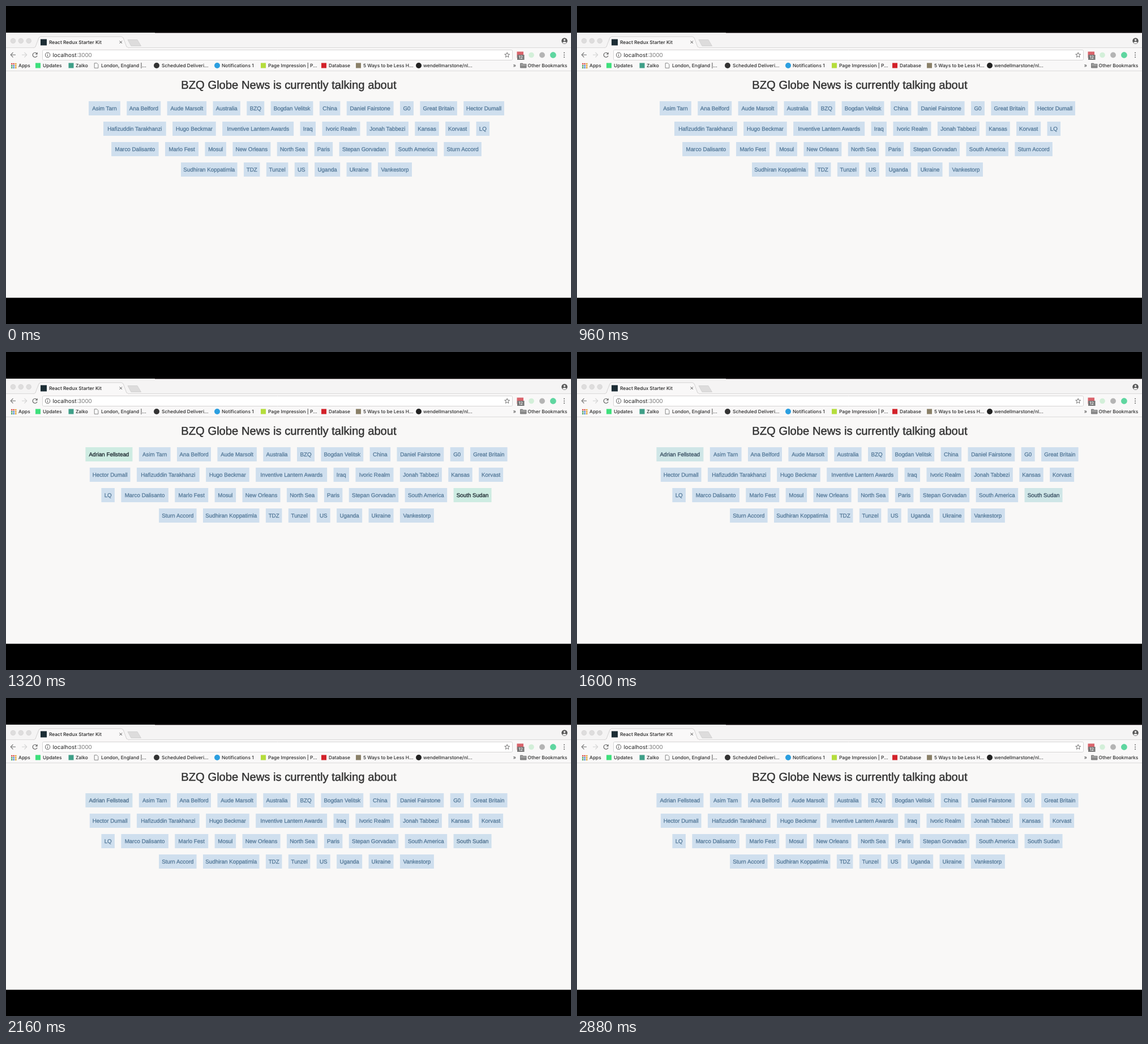
Recreate the animation shown at these times as an HTML page with a canvas. Size 998 by 561 pixels, loop 3 s.

```html
<!DOCTYPE html>
<html lang="en">
<head>
<meta charset="utf-8">
<title>Talking about</title>
<style>
  html, body { margin: 0; width: 100%; height: 100%; overflow: hidden; background: #000; }
  canvas { display: block; }
</style>
</head>
<body>
<canvas id="stage" width="998" height="561"></canvas>
<script>
const ctx = document.getElementById('stage').getContext('2d');
const LOOP = 3000, ARRIVE = 1000, FADE = 1700, STEP = 40;
const UI = 'Inter, Roboto, sans-serif';
const PAGE = '"Liberation Sans", Arial, sans-serif';
ctx.textRendering = 'geometricPrecision';

// label, box width; a leading + marks tags that arrive later
const tags = [
  ['+Adrian Fellstead', 83], ['Asim Tarn', 55.8], ['Ana Belford', 60], ['Aude Marsolt', 69.5],
  ['Australia', 48.3], ['BZQ', 31], ['Bogdan Velitsk', 74.8], ['China', 36.5],
  ['Daniel Fairstone', 82.8], ['G0', 24], ['Great Britain', 65.5], ['Hector Dumall', 71.7],
  ['Hafizuddin Tarakhanzi', 110.8], ['Hugo Beckmar', 76.6], ['Inventive Lantern Awards', 126],
  ['Iraq', 27.5], ['Ivoric Realm', 67], ['Jonah Tabbezi', 74], ['Kansas', 42.5],
  ['Korvast', 43], ['LQ', 23.5], ['Marco Dalisanto', 83.5], ['Marlo Fest', 59],
  ['Mosul', 37.5], ['New Orleans', 67], ['North Sea', 54.5], ['Paris', 32.5],
  ['Stepan Gorvadan', 87.5], ['South America', 74.5], ['+South Sudan', 67],
  ['Sturn Accord', 66.5], ['Sudhiran Koppatimla', 99.5], ['TDZ', 28.5], ['Tunzel', 38.5],
  ['US', 24], ['Uganda', 45], ['Ukraine', 44], ['Vankestorp', 60]
].map(([s, w]) => ({ label: s.replace('+', ''), w, fresh: s[0] === '+' }));

// label, text x, icon kind, icon colour, icon centre x
const bookmarks = [
  ['Apps', 22, 'grid', '', 13.5],
  ['Updates', 65, 'square', '#3fe07c', 56.5],
  ['Zalko', 123, 'square', '#3f9f88', 115],
  ['London, England |...', 168, 'doc', '#777', 159.5],
  ['Scheduled Deliveri...', 275, 'circle', '#333', 266],
  ['Notifications 1', 381, 'circle', '#2b9fe0', 373],
  ['Page Impression | P...', 463, 'square', '#b4dd3c', 454.5],
  ['Database', 570, 'square', '#d3222a', 561.5],
  ['5 Ways to be Less H...', 631, 'square', '#8a8068', 622.5],
  ['wendellmarstone/nl...', 737, 'circle', '#222', 729]
];

function rect(x, y, w, h, color) {
  ctx.fillStyle = color;
  ctx.fillRect(x, y, w, h);
}

function disc(x, y, r, color) {
  ctx.beginPath();
  ctx.arc(x, y, r, 0, Math.PI * 2);
  ctx.fillStyle = color;
  ctx.fill();
}

function path(points, { fill, stroke, width = 1, close = false }) {
  ctx.beginPath();
  points.forEach(([x, y]) => ctx.lineTo(x, y));
  if (close) ctx.closePath();
  if (fill) { ctx.fillStyle = fill; ctx.fill(); }
  if (stroke) { ctx.strokeStyle = stroke; ctx.lineWidth = width; ctx.stroke(); }
}

function ring(x, y, r, color, width = 1, from = 0, to = Math.PI * 2) {
  ctx.beginPath();
  ctx.arc(x, y, r, from, to);
  ctx.strokeStyle = color;
  ctx.lineWidth = width;
  ctx.stroke();
}

function text(s, x, y, font, color, align = 'left', bold = 0) {
  ctx.font = font;
  ctx.textAlign = align;
  ctx.fillStyle = color;
  ctx.fillText(s, x, y);
  if (bold) {
    ctx.strokeStyle = color;
    ctx.lineWidth = bold;
    ctx.lineJoin = 'round';
    ctx.strokeText(s, x, y);
  }
}

function drawTabs() {
  rect(0, 47, 998, 467, '#f9f8f7');
  rect(0, 514, 998, 1, '#b0afae');
  rect(0, 47, 998, 27, '#f5f4f4');
  rect(263, 47, 735, 1, '#8c8487');
  for (const x of [12.5, 26.3, 40.2]) {
    disc(x, 61.5, 4.5, '#dedddd');
    ring(x, 61.5, 4.3, '#d2d1d1', 0.6);
  }
  rect(0, 73, 998, 1, '#dad9d9');
  path([[49, 74], [52, 72], [58, 56], [61, 54], [204, 54], [207, 56], [213, 72], [217, 74]],
    { fill: '#f9f8f8', stroke: '#c9c8c8', width: 0.8 });
  rect(50, 73.5, 166, 1.5, '#f9f8f8');
  path([[215, 59.5], [232, 59.5], [238.5, 70.5], [221, 70.5]],
    { fill: '#dddcdc', stroke: '#cfcece', width: 0.8, close: true });
  rect(61, 58.5, 11, 11, '#1c2d35');
  text('React Redux Starter Kit', 76, 67, '500 8.4px ' + UI, '#222');
  path([[200.5, 61.5], [205, 66]], { stroke: '#555' });
  path([[205, 61.5], [200.5, 66]], { stroke: '#555' });

  disc(986.5, 61.5, 5.2, '#555');
  disc(986.5, 60, 1.8, '#f5f4f4');
  ctx.beginPath();
  ctx.ellipse(986.5, 64.6, 3.2, 1.5, 0, 0, Math.PI * 2);
  ctx.fill();
}

function drawArrow(x, dir, color) {
  path([[x - 4.5 * dir, 86.2], [x + 4.5 * dir, 86.2]], { stroke: color, width: 1.1 });
  path([[x, 82], [x + 4.3 * dir, 86.2], [x, 90.5]], { stroke: color, width: 1.1 });
}

function drawToolbar() {
  rect(0, 74.5, 998, 40, '#f9f8f8');
  drawArrow(12.5, -1, '#777');
  drawArrow(32.5, 1, '#d3d3d3');
  ring(51.2, 86.3, 4, '#666', 1.2, 0.35, 5.5);
  path([[55.7, 81.5], [55.7, 85.5], [51.7, 85.5]], { fill: '#666', close: true });

  ctx.beginPath();
  ctx.roundRect(64.5, 77.5, 830, 18, 2);
  ctx.fillStyle = '#fff';
  ctx.fill();
  ctx.strokeStyle = '#d2d1d1';
  ctx.lineWidth = 0.9;
  ctx.stroke();
  ring(73.6, 86.4, 4.1, '#555', 1);
  rect(73.1, 85.8, 1, 3, '#555');
  rect(73.1, 83.8, 1, 1.1, '#555');
  ctx.font = '9.8px ' + UI;
  const host = 'localhost', hostEnd = 82.5 + ctx.measureText(host).width;
  text(host, 82.5, 89.9, ctx.font, '#222');
  text(':3000', hostEnd, 89.9, ctx.font, '#777');

  const star = Array.from({ length: 10 }, (_, i) => {
    const r = i % 2 ? 2 : 4.7, a = i * Math.PI / 5 - Math.PI / 2;
    return [885.2 + r * Math.cos(a), 86.6 + r * Math.sin(a)];
  });
  path(star, { stroke: '#666', width: 0.9, close: true });

  rect(902.5, 80.5, 11.5, 11, '#d9636b');
  rect(903, 86, 12.5, 9, '#777');
  text('12', 909.3, 93.3, '500 7.5px ' + UI, '#fff', 'center');
  disc(928, 86.5, 4.8, '#d3efd9');
  disc(947, 86.5, 4.9, '#b4b4b4');
  disc(966.4, 86.5, 5.4, '#5fd6a0');
  for (const y of [82.6, 86.4, 90.2]) disc(986, y, 1, '#666');
}

const icons = {
  square: (x, c) => rect(x - 4.5, 100.5, 9, 9, c),
  circle: (x, c) => disc(x, 105, 5, c),
  doc: (x, c) => path([[x - 3.3, 100.8], [x + 1, 100.8], [x + 3.3, 103.2], [x + 3.3, 109.4], [x - 3.3, 109.4]],
    { fill: '#fff', stroke: c, width: 0.9, close: true }),
  grid: x => {
    const colors = ['#d9534a', '#d9534a', '#e0a030', '#4da35f', '#4a86d8', '#e0a030', '#4da35f', '#4a86d8', '#d9a030'];
    colors.forEach((c, i) => rect(x - 4.5 + i % 3 * 3.5, 100.8 + Math.floor(i / 3) * 3.4, 2.5, 2.5, c));
  }
};

function drawBookmarks() {
  const font = '500 8.4px ' + UI;
  for (const [label, x, kind, color, iconX] of bookmarks) {
    icons[kind](iconX, color);
    text(label, x, 108.2, font, '#2b2b2b');
  }
  text('»', 898.2, 108, '500 9px ' + UI, '#555', 'center');
  path([[908.5, 101.2], [912.5, 101.2], [913.7, 102.5], [919, 102.5], [919, 109], [908.5, 109]],
    { fill: '#8a8a8a', stroke: '#6c6c6c', width: 0.8, close: true });
  rect(909.3, 103.6, 9, 0.8, '#d5d5d5');
  text('Other Bookmarks', 921.5, 108.2, font, '#2b2b2b');
  rect(0, 114, 998, 1, '#dcdbda');
}

// CSS "ease" curve
function ease(x) {
  if (x <= 0) return 0;
  if (x >= 1) return 1;
  let lo = 0, hi = 1, s;
  for (let i = 0; i < 20; i++) {
    s = (lo + hi) / 2;
    if (0.75 * s * (1 - s) + s ** 3 < x) lo = s; else hi = s;
  }
  return 0.3 * s * (1 - s) ** 2 + 3 * s * s * (1 - s) + s ** 3;
}

function mix(a, b, k) {
  return `rgb(${a.map((v, i) => Math.round(v + (b[i] - v) * k))})`;
}

function wrap(list, gap, max) {
  const rows = [];
  let row = null;
  for (const tag of list) {
    if (!row || row.w + gap + tag.w > max) rows.push(row = { w: -gap, tags: [] });
    row.tags.push(tag);
    row.w += gap + tag.w;
  }
  return rows;
}

function drawTags(t) {
  const gap = 11.4;
  const k = ease((t - ARRIVE) / FADE);
  const shown = tags.filter(tag => t >= ARRIVE || !tag.fresh);
  wrap(shown, gap, 754).forEach((row, i) => {
    let x = 513 - row.w / 2;
    const y = 168 + i * 36;
    for (const tag of row.tags) {
      const p = tag.fresh ? k : 1;
      rect(x, y, tag.w, 25, mix([206, 241, 221], [207, 223, 238], p));
      text(tag.label, x + tag.w / 2, y + 16.1, '9.8px ' + PAGE,
        mix([0, 0, 0], [80, 117, 149], p), 'center', 0.25);
      x += tag.w + gap;
    }
  });
}

function draw(now) {
  const t = Math.floor(now % LOOP / STEP) * STEP;
  rect(0, 0, 998, 561, '#000');
  drawTabs();
  drawToolbar();
  drawBookmarks();
  text('BZQ Globe News is currently talking about', 499.5, 146, '20.2px ' + PAGE, '#333', 'center', 0.45);
  drawTags(t);
  requestAnimationFrame(() => draw(performance.now() - start));
}

const start = performance.now();
draw(0);
</script>
</body>
</html>
```
